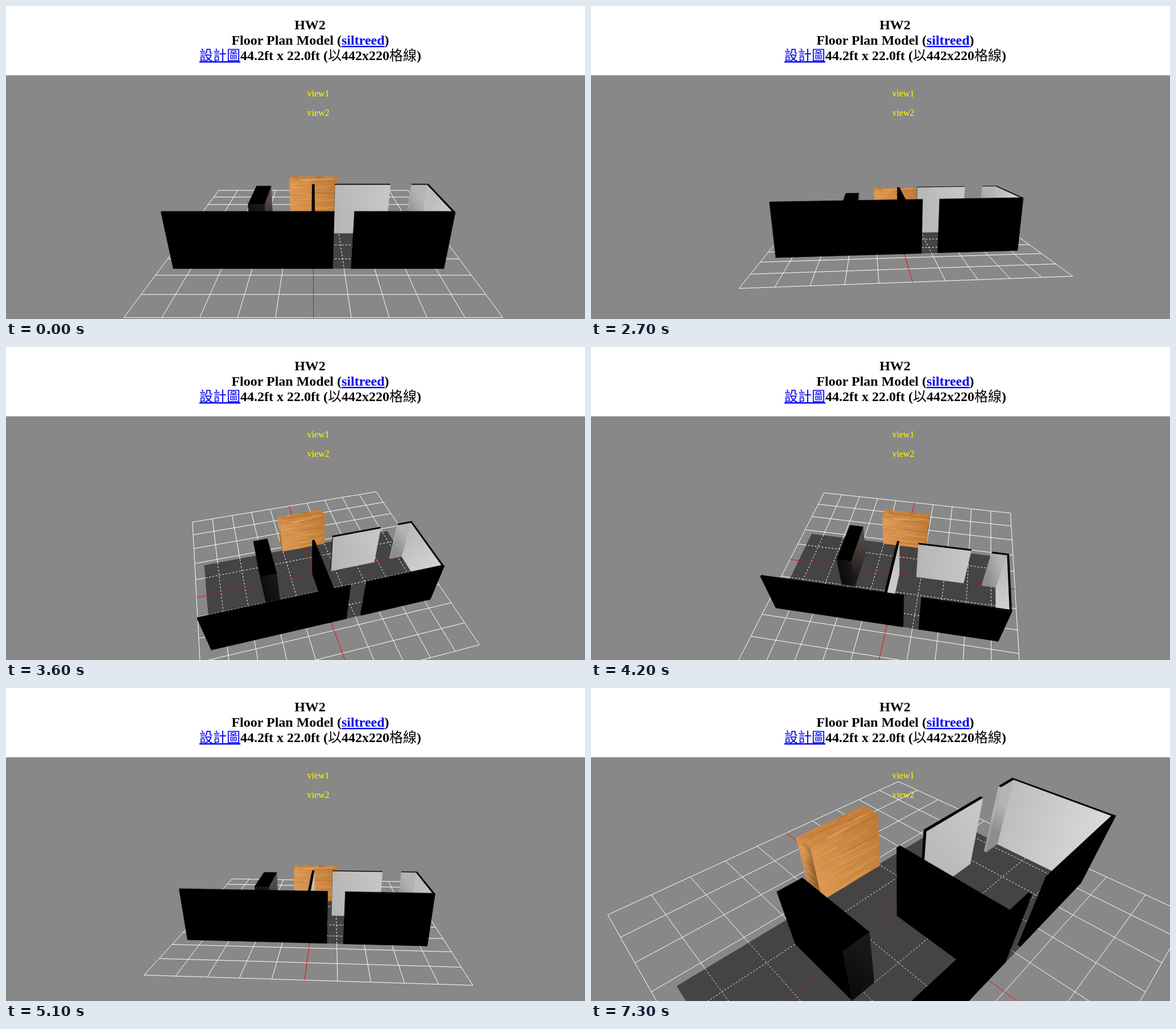
An HTML page with a canvas that plays this animation: 1018x550 px, repeating every 8.6 s.

```html
<!DOCTYPE html>
<html lang="zh-Hant">
<head>
<meta charset="utf-8">
<title>Floor Plan Model</title>
<style>
  html, body { margin: 0; width: 100%; height: 100%; overflow: hidden; background: #fff; }
  canvas, svg { position: absolute; left: 0; top: 0; display: block; }
  text { font-family: "Liberation Serif", "Times New Roman", serif; }
  .head { font-size: 24px; font-weight: bold; text-anchor: middle; }
  .cjk { font-family: "Noto Sans CJK TC", "Noto Sans CJK", sans-serif; font-weight: 400; }
  .link { fill: #00e; text-decoration: underline; }
  .view { font-size: 16px; fill: #ff0; }
</style>
</head>
<body>
<canvas id="stage" width="1018" height="550"></canvas>
<svg width="1018" height="550">
  <g class="head">
    <text x="534.5" y="41">HW2</text>
    <text x="535" y="68">Floor Plan Model (<tspan class="link">siltreed</tspan>)</text>
    <text x="535" y="95"><tspan class="cjk link">設計圖</tspan>44.2ft x 22.0ft (<tspan class="cjk">以</tspan>442x220<tspan class="cjk">格線</tspan>)</text>
  </g>
  <text class="view" x="529.5" y="159">view1</text>
  <text class="view" x="529.5" y="193">view2</text>
</svg>
<script>
const ctx = document.getElementById('stage').getContext('2d');
const LOOP = 8600, CX = 540.5, CY = 398.5, FOCAL = 596, TOP = 121.5;
const GRID = 250, CELL = 50, HOME = Math.hypot(300, 600);
const FLOOR = { x0: -229.5, x1: 213, z0: -89, z1: 131 };

// Orbit drag: time, azimuth, elevation (degrees)
const DRAG = [
  [2400, 0, 26.565], [2500, -0.6, 23.5], [2700, -4.8, 17.15], [2900, -11, 18.5],
  [3000, -13, 21], [3100, -14.5, 25], [3300, -16, 34.5], [3500, -16, 44.5],
  [3600, -15.22, 48.3], [3700, -14, 50.3], [3800, -10.5, 51], [4100, 5.8, 51],
  [4200, 9.8, 50.1], [4300, 11, 47.5], [4600, 11, 35.5], [4800, 9.5, 28],
  [4900, 7.8, 25.3], [5000, 5.5, 24], [5100, 3.1, 23.36]
];

const DARK = '#000';
const box = (x0, x1, h, z0, z1, faces = {}) => ({ x: [x0, x1], h, z: [z0, z1], faces });

// Listed from back to front
const BOXES = [
  box(-50.5, 50, 80, -114, -86, {
    wood: true, top: ['#cf8a47', '#c27a34'], front: ['#dc9852', '#c17c38'],
    left: ['#d29250', '#8c5c26'], right: ['#a86d2b', '#8b561d']
  }),
  box(40, 142, 100, -2, 2, { front: ['#b6b6b6', '#c6c6c6'] }),
  box(209.5, 213, 100, -2, 131, { left: ['#bdbdbd', '#dadada'] }),
  box(181, 209.5, 100, -2, 2, { front: ['#8e8e8e', '#b4b4b4'], left: ['#9c9c9c', '#b0b0b0'] }),
  box(-114, -85, 80, -50, 50, { front: ['#0c0c0c', '#181818'], right: ['#1c1918', '#544b47'] }),
  box(-2.5, 2, 100, 0, 131, { right: ['#d4d4d4', '#c0c0c0'] }),
  box(-229, 31.5, 100, 127.5, 131),
  box(62, 213, 100, 127.5, 131)
];

const lerp = (a, b, k) => a + (b - a) * k;
const hash = n => { const s = Math.sin(n * 127.1 + 3.7) * 43758.5453; return s - Math.floor(s); };

function orbit(azimuth, elevation, dist) {
  const a = azimuth * Math.PI / 180, e = elevation * Math.PI / 180;
  const sa = Math.sin(a), ca = Math.cos(a), se = Math.sin(e), ce = Math.cos(e);
  return {
    x: dist * ce * sa, y: dist * se, z: dist * ce * ca,
    project(x, y, z) {
      const near = x * sa + z * ca;
      const k = FOCAL / (dist - near * ce - y * se);
      return [CX + (x * ca - z * sa) * k, CY + (near * se - y * ce) * k];
    }
  };
}

function cameraAt(time) {
  const t = Math.floor(time / 100) * 100;
  if (t >= 5900) {
    const side = t < 7300 ? 45 : -45;
    return orbit(side, Math.atan2(300, Math.hypot(200, 200)) * 180 / Math.PI, Math.hypot(200, 300, 200));
  }
  const ticks = t < 1400 ? 0 : t >= 1500 && t < 1800 ? 3 : 2;
  const dist = HOME / 0.95 ** ticks;
  const i = DRAG.findIndex(k => k[0] > t);
  if (i === 0) return orbit(DRAG[0][1], DRAG[0][2], dist);
  if (i < 0) return orbit(DRAG.at(-1)[1], DRAG.at(-1)[2], dist);
  const [a, b] = [DRAG[i - 1], DRAG[i]], k = (t - a[0]) / (b[0] - a[0]);
  return orbit(lerp(a[1], b[1], k), lerp(a[2], b[2], k), dist);
}

function trace(points, close) {
  ctx.beginPath();
  points.forEach(p => ctx.lineTo(...p));
  if (close) ctx.closePath();
}

function drawGrid(cam) {
  const line = (x0, z0, x1, z1, color) => {
    ctx.strokeStyle = color;
    trace([cam.project(x0, 0, z0), cam.project(x1, 0, z1)]);
    ctx.stroke();
  };
  const both = (v, color) => {
    line(v, -GRID, v, GRID, color);
    line(-GRID, v, GRID, v, color);
  };
  for (let v = -GRID; v <= GRID; v += CELL) if (v) both(v, '#fff');
  both(0, '#f00');
}

function drawFloor(cam) {
  const { x0, x1, z0, z1 } = FLOOR;
  ctx.save();
  trace([[x0, z0], [x1, z0], [x1, z1], [x0, z1]].map(([x, z]) => cam.project(x, 0, z)), true);
  ctx.fillStyle = '#444';
  ctx.fill();
  ctx.clip();
  ctx.setLineDash([3, 3]);
  drawGrid(cam);
  ctx.restore();
}

// at(u, v) maps the unit square onto the face on screen
function drawGrain(at, seed) {
  for (let i = 0; i < 22; i++) {
    const v = hash(seed + i), bend = 0.06 * (hash(seed + i + 40) - 0.5);
    const from = hash(seed + i + 80) * 0.5, to = from + 0.3 + hash(seed + i + 120) * 0.4;
    const points = [];
    for (let s = 0; s <= 8; s++) {
      const u = Math.min(1, lerp(from, to, s / 8));
      points.push(at(u, Math.min(1, Math.max(0, v + bend * Math.sin(u * 7 + i)))));
    }
    trace(points);
    ctx.lineWidth = 1 + hash(seed + i + 160) * 2;
    ctx.strokeStyle = i % 2 ? 'rgba(140,75,15,.13)' : 'rgba(255,205,140,.18)';
    ctx.stroke();
  }
  ctx.lineWidth = 1;
}

function drawFace(cam, corner, colors, wood, seed) {
  const at = (u, v) => cam.project(...corner(u, v));
  trace([at(0, 0), at(1, 0), at(1, 1), at(0, 1)], true);
  let paint = DARK;
  if (colors) {
    paint = ctx.createLinearGradient(...at(0, 0.4), ...at(1, 0.6));
    colors.forEach((c, i) => paint.addColorStop(i, c));
  }
  ctx.fillStyle = ctx.strokeStyle = paint;
  ctx.lineWidth = 0.4;
  ctx.fill();
  ctx.stroke();
  ctx.lineWidth = 1;
  if (wood) drawGrain(at, seed);
}

function drawBox(cam, { x: [x0, x1], h, z: [z0, z1], faces }) {
  const face = (name, corner, seed) => drawFace(cam, corner, faces[name], faces.wood, seed);
  if (cam.x < x0) face('left', (u, v) => [x0, h * v, lerp(z0, z1, u)], 11);
  if (cam.x > x1) face('right', (u, v) => [x1, h * v, lerp(z1, z0, u)], 23);
  if (cam.z > z1) face('front', (u, v) => [lerp(x0, x1, u), h * v, z1], 5);
  if (cam.y > h) face('top', (u, v) => [lerp(x0, x1, u), h, lerp(z1, z0, v)], 37);
}

function draw(time) {
  const cam = cameraAt(time);
  ctx.clearRect(0, 0, 1018, 550);
  ctx.save();
  ctx.beginPath();
  ctx.rect(0, TOP, 1018, 550 - TOP);
  ctx.clip();
  ctx.fillStyle = '#888';
  ctx.fill();
  ctx.lineWidth = 1;
  ctx.lineJoin = 'round';
  drawGrid(cam);
  drawFloor(cam);
  BOXES.forEach(b => drawBox(cam, b));
  ctx.restore();
}

const start = performance.now();
function tick() {
  draw((performance.now() - start) % LOOP);
  requestAnimationFrame(tick);
}
tick();
</script>
</body>
</html>
```
